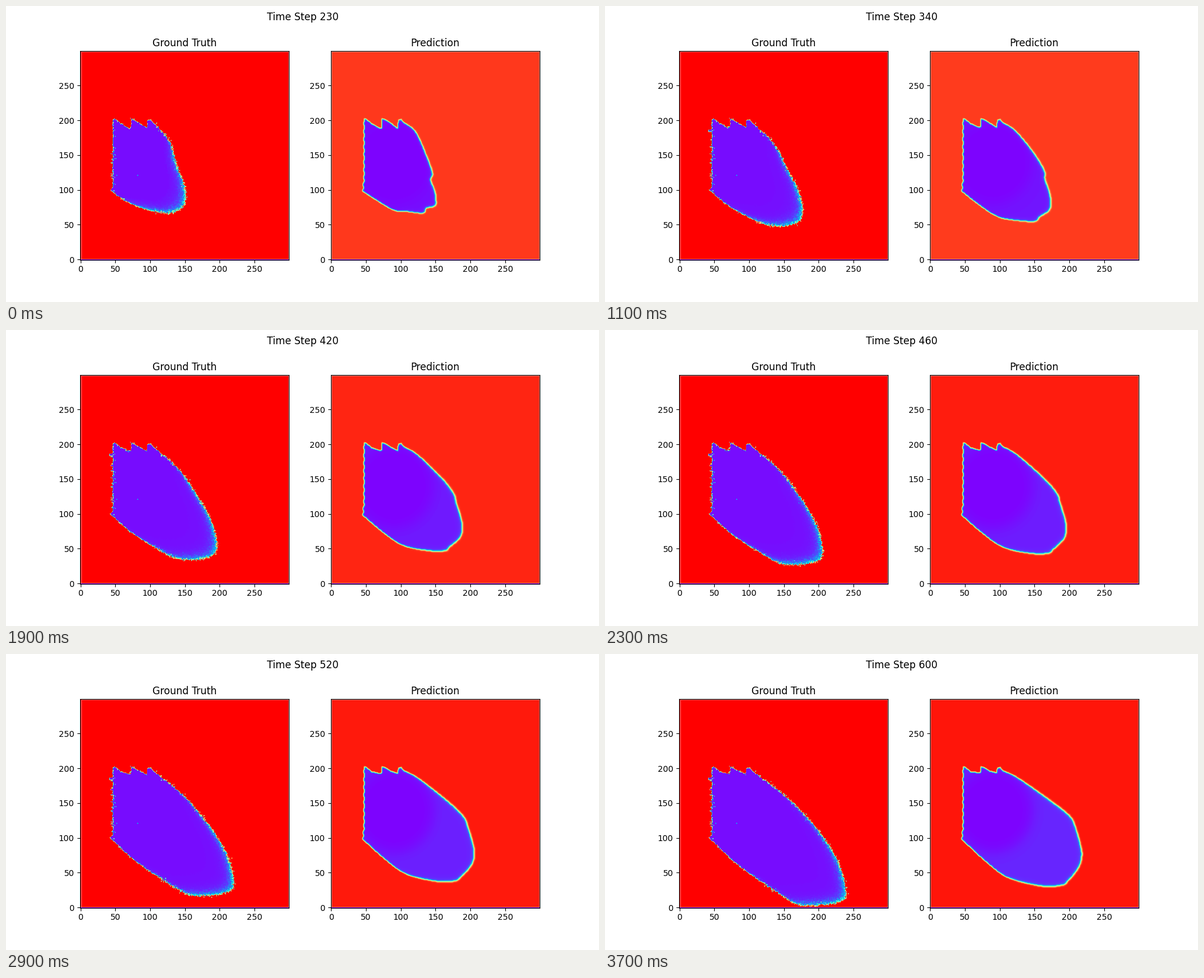
A matplotlib script that plays this animation: 1000 by 500 pixels, repeating every 3800 ms.

```python
import numpy as np
import matplotlib.pyplot as plt
from matplotlib.animation import FuncAnimation
from matplotlib.path import Path

N, FRAMES = 300, 38

# Fire front at the start and end of the loop, clockwise from the top tooth.
TRUE_FRONT = np.array([
    [(127, 171), (137, 138), (147, 112), (151, 90), (146, 75),
     (133, 68), (121, 67), (101, 70), (82, 76), (63, 85)],
    [(154, 158), (195, 116), (226, 69), (238, 28), (236, 12),
     (215, 5), (178, 3), (161, 8), (125, 32), (84, 61)]])
PRED_FRONT = np.array([
    [(121, 183), (135, 152), (145, 124), (142, 115), (148, 99), (150, 84),
     (148, 77), (136, 74), (132, 67), (110, 69), (90, 71), (64, 86)],
    [(127, 185), (178, 149), (200, 131), (207, 118), (215, 90), (217, 74),
     (212, 57), (196, 37), (187, 32), (160, 31), (112, 43), (80, 66)]])

rng = np.random.default_rng(4)
yy, xx = np.mgrid[:N, :N].astype(float)
GRID = np.column_stack([xx.ravel(), yy.ravel()])


def spline(pts, n=6):
    """Catmull-Rom curve through the points."""
    p = np.vstack([pts[:1], pts, pts[-1:]])
    a, b, c, d = (p[i:len(p) - 3 + i, None] for i in range(4))
    u = np.linspace(0, 1, n, endpoint=False)[None, :, None]
    curve = 0.5 * (2 * b + (c - a) * u + (2 * a - 5 * b + 4 * c - d) * u**2
                   + (3 * b - a - 3 * c + d) * u**3)
    return np.vstack([curve.reshape(-1, 2), pts[-1:]])


def outline(front, u, tip, left, notch):
    moving = front[0] + (front[1] - front[0]) * u
    teeth = [(47, 202), (49, 202), (58, 195), (70, notch), (72, notch + 1),
             (73, 202), (76, 201.5), (85, 196), (95, notch), (96.5, 200.5), (100, 201)]
    return np.vstack([spline(np.vstack([[105, 196], moving, tip])), left, teeth])


def inside(poly, pts):
    return Path(poly).contains_points(pts).reshape(N, N)


def blur(a, sigma):
    i = np.arange(N)
    g = np.exp(-0.5 * ((i[:, None] - i) / sigma) ** 2)
    g /= g.sum(1, keepdims=True)
    return g @ a @ g.T


def true_frames():
    spread = np.where(xx > 105, 1.0, 0.5)
    spread = spread * np.where(rng.random((N, N)) < 0.06, 2.2, 1)
    pts = GRID + (rng.normal(size=(N, N, 2)) * spread[..., None]).reshape(-1, 2)
    left = [(46.5, 104), (46.5, 200)]

    # Time at which the front reaches each cell.
    arrival = np.full((N, N), 999.0)
    for k in range(-10, FRAMES):
        u = k / (FRAMES - 1)
        v = max(u, 0)
        hit = inside(outline(TRUE_FRONT, u, (43.5 - 2 * v, 99 + 2 * v),
                             left, 188.5 + 3.5 * v), pts)
        arrival[hit & (arrival > 900)] = k if k > -10 else -99
    for y in rng.integers(104, 190, 18):
        arrival[y, 47 - rng.integers(1, 4):47] = rng.integers(-20, 25)
    arrival[184:187, 42:47] = 8

    grain, fleck = rng.random((2, N, N))
    specks = (fleck < 0.03) & (xx > 47) & (xx < 53) & (yy > 105) & (yy < 190)
    specks[121, 82] = True
    frames = []
    for i in range(FRAMES):
        burnt = arrival <= i
        age = np.clip(i - arrival + grain, 0, 100)
        val = 0.018 + 0.045 * np.exp(-age / 5)
        val += np.exp(-age / 1.7) * (0.1 + 0.5 * fleck)
        rim = burnt & (blur(burnt, 1) < 0.7) & (fleck < 0.25)
        val[rim] = 0.15 + 0.5 * grain[rim]
        val[specks] = 0.45
        img = np.where(burnt, val, 1.0)
        img[0] = 0
        frames.append(img)
    return frames


def pred_frames():
    y = np.linspace(103, 199, 60)
    left = np.column_stack([47.2 + 0.8 * np.sin(2 * np.pi * y / 11) - (y < 112), y])
    wide = np.clip((xx - 90) / 80, 0, 1)
    core = np.hypot((xx - 90) / 56, (yy - 140) / 60)
    newer = 1 / (1 + np.exp(-(core - 1) * 10))
    frames = []
    for i in range(FRAMES):
        u = i / (FRAMES - 1)
        eased = u + 0.2 * u * (1 - u)
        mask = inside(outline(PRED_FRONT, eased, (44.5, 99), left, 188 + 5.5 * u), GRID)
        soft = blur(mask, 0.8) * (1 - wide) + blur(mask, 1.3) * wide
        glow = 0.1 * wide * (1 - blur(mask, 4))
        inner = 0.004 + (0.015 + 0.03 * u) * newer + glow
        level = np.interp(i, [0, 6, 24, 37], [0.927, 0.908, 0.966, 0.972])
        img = level * (1 - soft) + inner * soft
        img[0] = 0
        frames.append(img)
    return frames


truth, pred = true_frames(), pred_frames()

fig, axes = plt.subplots(1, 2, figsize=(10, 5), dpi=100)
title = fig.suptitle("Time Step 230")
images = []
for ax, name, data in zip(axes, ("Ground Truth", "Prediction"), (truth, pred)):
    images.append(ax.imshow(data[0], cmap="rainbow", origin="lower", vmin=0, vmax=1))
    # Pale inner rim on three sides.
    ax.plot([0.8, 0.8, 298.8, 298.8], [0.8, 298.6, 298.6, 0.8],
            color="white", alpha=0.45, lw=0.72, scalex=False, scaley=False)
    ax.set_title(name)
    ax.set_xticks(range(0, N, 50))
    ax.set_yticks(range(0, N, 50))


def update(i):
    images[0].set_data(truth[i])
    images[1].set_data(pred[i])
    title.set_text(f"Time Step {230 + 10 * i}")
    return [*images, title]


anim = FuncAnimation(fig, update, frames=FRAMES, interval=100, repeat=True, repeat_delay=0)
plt.show()
```
